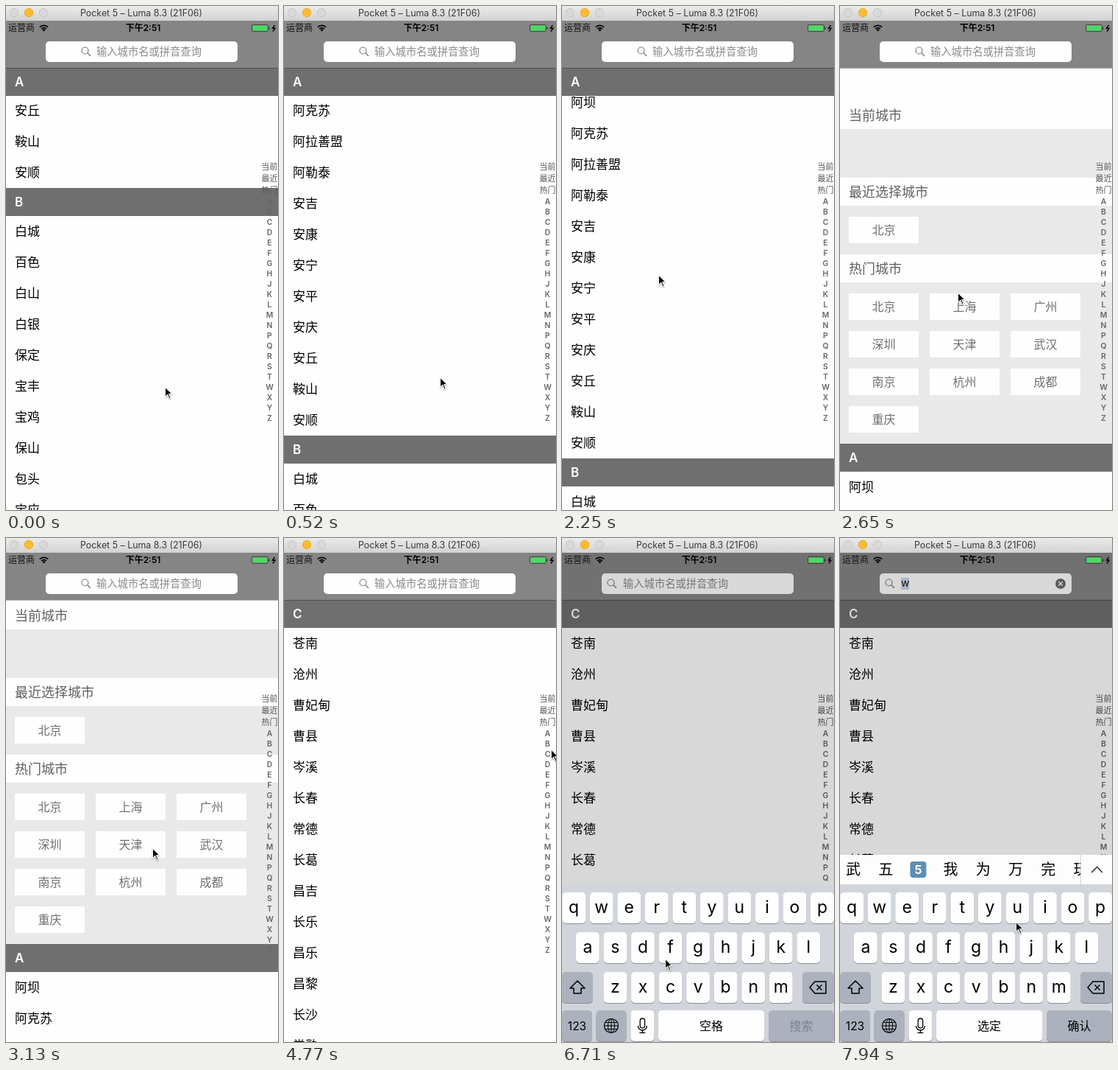
Write an HTML page with a canvas that moves like this. It is 370 by 684 pixels and loops after 8000 ms.

```html
<!DOCTYPE html>
<html lang="zh">
<head>
<meta charset="utf-8">
<title>City picker</title>
<style>
html, body { margin: 0; width: 370px; height: 684px; overflow: hidden; background: #fff; }
canvas { display: block; width: 370px; height: 684px; }
</style>
</head>
<body>
<canvas id="stage"></canvas>
<script>
const W = 370, H = 684, LOOP = 8000, TOP = 84, HEAD = 38, ROW = 42;
const FONT = 'Inter, "Noto Sans CJK SC", "Noto Sans CJK", sans-serif';
const canvas = document.getElementById('stage');
const ratio = window.devicePixelRatio || 1;
canvas.width = W * ratio;
canvas.height = H * ratio;
const c = canvas.getContext('2d');

const words = s => s.split(' ');
const sections = [
  { name: '当前城市', grid: [], height: 66 },
  { name: '最近选择城市', grid: ['北京'], height: 66 },
  { name: '热门城市', grid: words('北京 上海 广州 深圳 天津 武汉 南京 杭州 成都 重庆'), height: 219 },
  { name: 'A', rows: words('阿坝 阿克苏 阿拉善盟 阿勒泰 安吉 安康 安宁 安平 安庆 安丘 鞍山 安顺') },
  { name: 'B', rows: words('白城 百色 白山 白银 保定 宝丰 宝鸡 保山 包头 宝应 北海 本溪 毕节 滨州 亳州') },
  { name: 'C', rows: words('苍南 沧州 曹妃甸 曹县 岑溪 长春 常德 长葛 昌吉 长乐 昌乐 昌黎 长沙 常熟 常州') }
];
let end = TOP;
for (const s of sections) {
  s.top = end;
  end += HEAD + (s.rows ? s.rows.length * ROW : s.height);
  s.end = end;
}
const C_SCROLL = sections[5].top - TOP;

// Timeline in ms
const BOUNCE = 2650, FLICK = 3540, TAP_C = 4765, FOCUS = 5683, CANCEL_END = 6080, TYPED = 7420;

const part = (t, from, to) => Math.min(1, Math.max(0, (t - from) / (to - from)));
const easeOut = (t, from, to, power) => 1 - Math.pow(1 - part(t, from, to), power);
function smooth(t, from, to) {
  const u = part(t, from, to);
  return u * u * (3 - 2 * u);
}
const focusEase = (t, power) => easeOut(t, FOCUS, FOCUS + 400, power);

function scrollAt(t) {
  if (t >= TAP_C) return C_SCROLL;
  if (t >= FLICK) return 690 * easeOut(t, FLICK, 4300, 2.5);
  if (t >= BOUNCE) return -45 * Math.exp((BOUNCE - t) / 150);
  return 844 - 451 * easeOut(t, 60, 990, 2) + 297 * smooth(t, 990, 1800) - 735 * smooth(t, 2031, BOUNCE);
}

// Pointer moves: start, end, x, y
const moves = [
  [60, 990, 207, 490], [990, 2250, 131, 364], [2250, 3130, 199, 420], [3540, 4770, 363, 286],
  [4940, 5530, 150, 55], [5690, 5820, 172, 83], [5820, 6530, 161, 586], [6530, 7180, 52, 503],
  [TYPED, 7940, 239, 520]
];
function pointerAt(t) {
  let px = 216, py = 516;
  for (const [from, to, x, y] of moves) {
    const u = smooth(t, from, to);
    px += (x - px) * u;
    py += (y - py) * u;
  }
  return [Math.round(px), Math.round(py)];
}

function box(x, y, w, h, fill) {
  c.fillStyle = fill;
  c.fillRect(x, y, w, h);
}
function round(x, y, w, h, r, fill) {
  c.fillStyle = fill;
  c.beginPath();
  c.roundRect(x, y, w, h, r);
  c.fill();
}
function disc(x, y, r, fill) {
  c.fillStyle = fill;
  c.beginPath();
  c.arc(x, y, r, 0, 7);
  c.fill();
}
function ring(x, y, rx, ry, color, width) {
  c.strokeStyle = color;
  c.lineWidth = width;
  c.beginPath();
  c.ellipse(x, y, rx, ry, 0, 0, 7);
  c.stroke();
}
function path(points, closed) {
  c.beginPath();
  points.forEach(p => c.lineTo(p[0], p[1]));
  if (closed) c.closePath();
}
function line(points, color, width, closed) {
  c.strokeStyle = color;
  c.lineWidth = width;
  path(points, closed);
  c.stroke();
}
function cross(x, y, r, color, width) {
  line([[x - r, y - r], [x + r, y + r]], color, width);
  line([[x + r, y - r], [x - r, y + r]], color, width);
}
// y is the middle of the glyphs
function text(s, x, y, size, color, align = 'left', weight = 400) {
  c.font = `${weight} ${size}px ${FONT}`;
  c.textAlign = align;
  c.fillStyle = color;
  c.fillText(s, x, y + size * 0.37);
}

function drawList(scroll, ruled) {
  box(0, TOP, W, H - TOP, '#fefefe');
  for (const s of sections) {
    const y = s.top + HEAD - scroll;
    if (s.end - scroll < TOP || s.top - scroll > H) continue;
    if (s.grid) {
      box(0, y, W, s.height, '#e9e9e9');
      s.grid.forEach((name, i) => {
        const x = 12 + i % 3 * 110, by = y + 15 + Math.floor(i / 3) * 51;
        box(x, by, 95, 36, '#fefefe');
        text(name, x + 47.5, by + 18, 16, '#6f6f6f', 'center');
      });
    } else {
      s.rows.forEach((name, i) => {
        text(name, 12, y + i * ROW + 21, 17, '#000');
        if (ruled) box(330, y + (i + 1) * ROW - 1, 16, 1, '#c8c8c8');
      });
    }
  }
  for (const s of sections) {
    const y = Math.min(Math.max(s.top - scroll, TOP), s.end - HEAD - scroll);
    if (y < TOP - HEAD || y > H) continue;
    box(0, y, W, HEAD, s.grid ? '#fefefe' : '#6f6f6f');
    if (s.grid) text(s.name, 12, y + 19, 18, '#606060', 'left', 500);
    else text(s.name, 12, y + 19, 17, '#fff', 'left', 600);
  }
}

function drawIndex() {
  words('当前 最近 热门').forEach((s, i) => text(s, 358.5, 218 + i * 16.2, 11, '#555', 'center'));
  [...'ABCDEFGHJKLMNPQRSTWXYZ'].forEach((s, i) =>
    text(s, 358.5, 265 + i * 14, 10.5, '#666', 'center', 600));
}

function drawSearch(t) {
  const shrunk = t >= FOCUS && t < CANCEL_END;
  const shift = focusEase(t, 3.36);
  const x = 109 - 41 * shift;
  box(0, 20, W, TOP - 20, '#858585');
  box(0, TOP, W, 1, 'rgba(0,0,0,.3)');
  round(54, 48, shrunk ? 221 : 261, 28, 5, '#fefefe');
  ring(x - 1.5, 60.5, 4.5, 4.5, '#7c7c7c', 1.2);
  line([[x + 1.8, 63.8], [x + 6, 68]], '#7c7c7c', 1.4);
  if (t < TYPED) {
    text('输入城市名或拼音查询', 123 - 40 * shift, 62, 14.3, '#8a8a8a');
  } else {
    box(83, 54, 11, 16, '#c8d7e8');
    text('w', 83, 61, 14, '#111');
    disc(300, 62, 7, '#6a6a6a');
    cross(300, 62, 2.7, '#fff', 1.3);
  }
  if (shrunk) text('Can', 286, 62, 15.5, '#717171');
}

function drawStatus() {
  const bar = c.createLinearGradient(0, 0, 0, 20);
  bar.addColorStop(0, '#ebebeb');
  bar.addColorStop(1, '#d2d2d2');
  box(0, 0, W, 20, bar);
  for (let i = 0; i < 3; i++) {
    const x = 11 + i * 20, lit = i === 1;
    disc(x, 9, 6, lit ? '#fdbc2f' : '#d9d9d9');
    ring(x, 9, 5.7, 5.7, lit ? '#e0a028' : '#bcbcbc', 0.7);
  }
  text('Pocket 5 – Luma 8.3 (21F06)', 184, 9, 12.4, '#3a3a3a', 'center');

  text('运营商', 3, 30, 12, '#111');
  for (let r = 1.5; r < 9; r += 3.3) {
    c.strokeStyle = '#000';
    c.lineWidth = r < 2 ? 3 : 1.7;
    c.beginPath();
    c.arc(51.5, 34.5, r, -Math.PI * 0.75, -Math.PI * 0.25);
    c.stroke();
  }
  text('下午2:51', 186.5, 30, 12, '#000', 'center', 600);
  c.strokeStyle = '#333';
  c.lineWidth = 0.8;
  c.beginPath();
  c.roundRect(334.4, 25.4, 22, 9.2, 2);
  c.stroke();
  round(335.4, 26.4, 20, 7.2, 1, '#4cd964');
  box(357.2, 28.5, 1.2, 3.2, '#333');
  line([[365.5, 26], [362.5, 30.3], [366, 30.3], [363, 34.5]], '#000', 1.4);
}

function key(x, y, w, dark) {
  round(x, y + 1, w, 42, 5, '#8a8d92');
  round(x, y, w, 42, 5, dark ? '#abb2bd' : '#fefefe');
}

function drawShift(x, y) {
  const half = [[0, -9], [10, 1], [5, 1], [5, 8]];
  const mirror = half.slice(1).reverse().map(([dx, dy]) => [-dx, dy]);
  line([...half, ...mirror].map(([dx, dy]) => [x + dx, y + dy]), '#000', 1.5, true);
}
function drawDelete(x, y) {
  line([[x - 11, y], [x - 4, y - 8], [x + 11, y - 8], [x + 11, y + 8], [x - 4, y + 8]], '#000', 1.5, true);
  cross(x + 2, y, 3.5, '#000', 1.5);
}
function drawGlobe(x, y) {
  ring(x, y, 9.5, 9.5, '#000', 1.2);
  ring(x, y, 4.5, 9.5, '#000', 1);
  line([[x, y - 9.5], [x, y + 9.5]], '#000', 1);
  for (const dy of [-4.5, 0, 4.5]) {
    const half = Math.sqrt(90 - dy * dy);
    line([[x - half, y + dy], [x + half, y + dy]], '#000', 1);
  }
}
function drawMic(x, y) {
  c.lineWidth = 1.3;
  c.beginPath();
  c.roundRect(x - 3.2, y - 10, 6.4, 13, 3.2);
  c.stroke();
  c.beginPath();
  c.arc(x, y, 6, 0, Math.PI);
  c.stroke();
  line([[x, y + 6], [x, y + 9.5]], '#000', 1.3);
  line([[x - 4, y + 9.5], [x + 4, y + 9.5]], '#000', 1.3);
}

function drawKeyboard(t) {
  const k = Math.round(H - 214 * focusEase(t, 4)), typed = t >= TYPED;
  box(0, k, W, 214, '#d1d5db');
  words('qwertyuiop asdfghjkl zxcvbnm').forEach((row, r) => {
    const y = k + 11 + r * 54, left = 185 - row.length * 18.78 + 3;
    [...row].forEach((s, i) => {
      const x = left + i * 37.55;
      key(x, y, 31.8);
      text(s, x + 15.9, y + 19.5, 23, '#000', 'center');
    });
  });
  key(0, k + 119, 42, true);
  key(327, k + 119, 43, true);
  c.lineJoin = 'round';
  drawShift(21, k + 140);
  drawDelete(348, k + 140);

  let y = k + 171;
  key(0, y, 41, true);
  key(46.5, y, 41, true);
  key(93.5, y, 31.8);
  key(131, y, 144.5);
  key(281, y, 88.5, true);
  y += 21;
  text('123', 20.5, y, 15.5, '#000', 'center');
  drawGlobe(67, y);
  drawMic(109.4, y);
  text(typed ? '选定' : '空格', 203, y, 16, '#000', 'center');
  text(typed ? '确认' : '搜索', 325.5, y, 16, typed ? '#000' : '#7d838c', 'center');
  if (typed) drawCandidates(k - 40);
}

function drawCandidates(y) {
  box(0, y, W, 40, '#fdfdfd');
  [...'武五5我为万完玩'].forEach((s, i) => {
    const x = 18 + i * 44.2;
    if (s !== '5') return text(s, x, y + 20, 20, '#000', 'center');
    round(x - 11, y + 9, 22, 22, 4, '#5c8fb8');
    text(s, x, y + 20, 16, '#fff', 'center', 700);
  });
  box(327, y, 43, 40, '#fdfdfd');
  box(327, y, 1, 40, '#d0d0d0');
  line([[342, y + 24], [349.5, y + 16.5], [357, y + 24]], '#222', 1.4);
}

function drawPointer(x, y) {
  c.save();
  c.translate(x, y);
  c.shadowColor = 'rgba(0,0,0,.35)';
  c.shadowBlur = 2;
  c.shadowOffsetY = 1;
  c.lineJoin = 'miter';
  line([[1, 2.4], [1, 13.2], [3.9, 10.6], [6.5, 16.4], [7.4, 16], [4.9, 10.3], [8.7, 10.1]], '#fff', 2, true);
  c.shadowColor = 'transparent';
  c.fillStyle = '#000';
  c.fill();
  c.restore();
}

function draw(t) {
  c.setTransform(ratio, 0, 0, ratio, 0, 0);
  drawList(Math.round(scrollAt(t)), t >= 870 && t < 1110);
  drawIndex();
  drawSearch(t);
  box(0, 20, W, H - 20, `rgba(0,0,0,${0.15 * focusEase(t, 2.2)})`);
  drawStatus();
  if (t > FOCUS) drawKeyboard(t);
  drawPointer(...pointerAt(t));
}

const start = performance.now();
function tick() {
  draw((performance.now() - start) % LOOP);
  requestAnimationFrame(tick);
}
tick();
</script>
</body>
</html>
```
